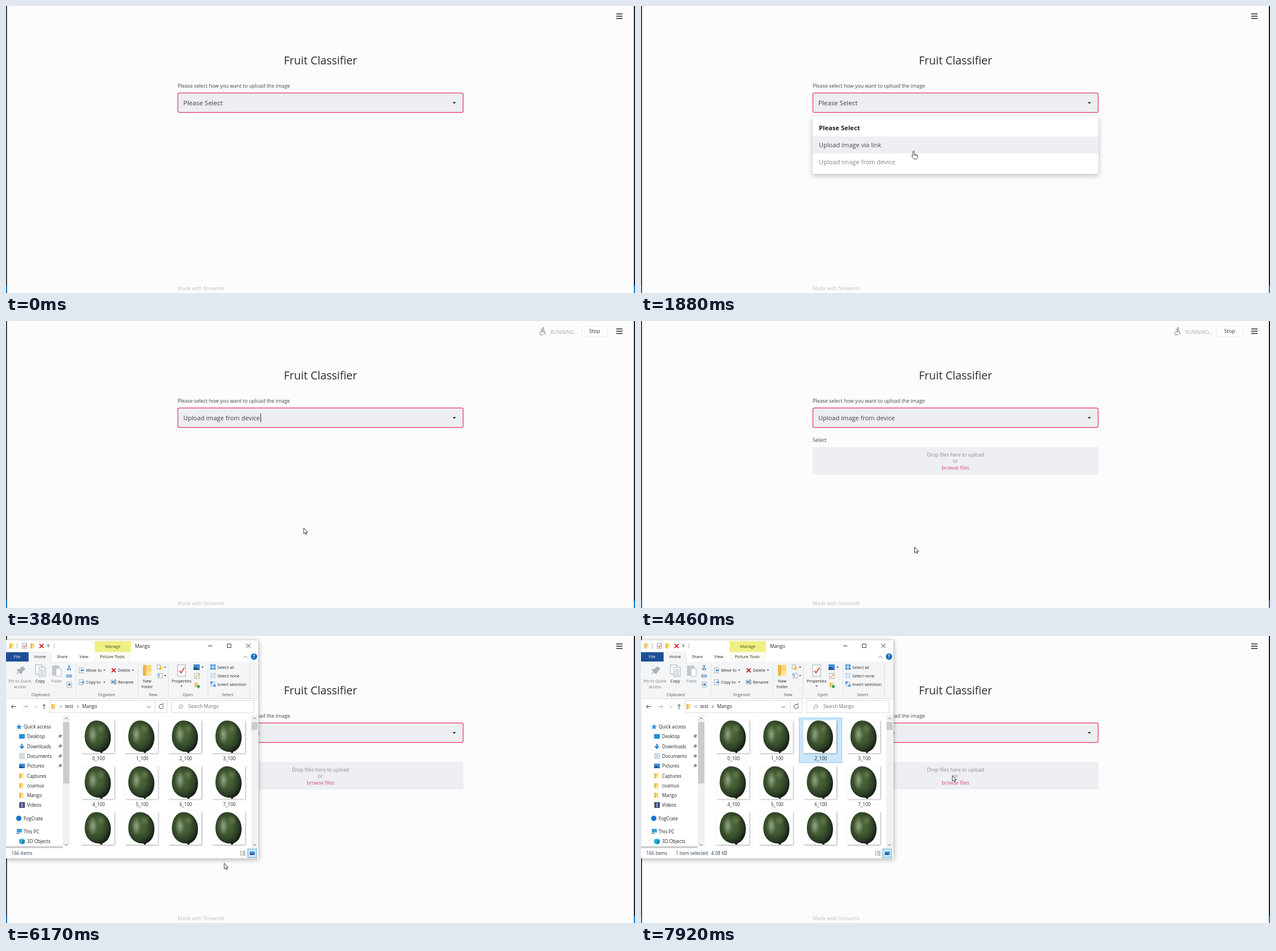
An HTML page that plays this animation: 1107x506 px, repeating every 8 s.

```html
<!DOCTYPE html>
<html lang="en">
<head>
<meta charset="utf-8">
<title>Fruit Classifier</title>
<style>
html, body { margin: 0; width: 100%; height: 100%; overflow: hidden; background: #fcfcfc; }
svg { display: block; width: 1107px; height: 506px; }
text { font-family: "Open Sans", "Noto Sans", sans-serif; white-space: pre; }
.mid { text-anchor: middle; }
</style>
</head>
<body>
<svg id="stage" viewBox="0 0 1107 506"></svg>
<script>
const LOOP = 8000;

// Markup helpers
const text = (x, y, s, size, fill = '#222', attr = '') =>
  `<text x="${x}" y="${y}" font-size="${size}" fill="${fill}" ${attr}>${s}</text>`;
const mid = (x, y, s, size, fill, attr = '') => text(x, y, s, size, fill, 'class="mid" ' + attr);
const rect = (x, y, w, h, fill, attr = '') =>
  `<rect x="${x}" y="${y}" width="${w}" height="${h}" fill="${fill}" ${attr}/>`;
const line = (d, stroke = '#555', width = 1, fill = 'none') =>
  `<path d="${d}" stroke="${stroke}" stroke-width="${width}" fill="${fill}"/>`;
const shape = (d, fill) => `<path d="${d}" fill="${fill}"/>`;
const circle = (x, y, r, fill) => `<circle cx="${x}" cy="${y}" r="${r}" fill="${fill}"/>`;
const oval = (x, y, rx, ry, fill) => `<ellipse cx="${x}" cy="${y}" rx="${rx}" ry="${ry}" fill="${fill}"/>`;
const group = (id, ...parts) => `<g id="${id}">${parts.join('')}</g>`;

// Small icons
const caretDown = (x, y, r = 2, fill = '#333') => shape(`M${x - r} ${y - r / 2}h${2 * r}l${-r} ${r}z`, fill);
const cross = (x, y, r, stroke, w) => line(`M${x - r} ${y - r}l${2 * r} ${2 * r}m0 ${-2 * r}l${-2 * r} ${2 * r}`, stroke, w);
const folder = (x, y, w = 7, h = 9) =>
  rect(x, y, w, h, '#f9d978') + rect(x, y, w * .4, h, '#e9b84a') + rect(x + w * .4, y + h * .6, w * .6, h * .4, '#fbe6a2');
const sheet = (x, y, w, h, stroke = '#8a939c') =>
  rect(x, y, w, h, '#fff', `stroke="${stroke}" stroke-width=".8"`);
const lines = (x, y, w, n, step, stroke) =>
  Array.from({ length: n }, (_, i) => line(`M${x} ${y + i * step}h${w}`, stroke, .7)).join('');
const picture = (x, y, w, h) =>
  rect(x, y, w, h, '#3f8fd8') + shape(`M${x} ${y + h}v${-h * .35}l${w * .35} ${-h * .25}l${w * .65} ${h * .6}z`, '#27548c');
const pin = (x, y) => line(`M${x - 3} ${y + 3}l2.5-2.5`, '#888', .8) +
  shape(`M${x - 2} ${y - 1}l4 4 1-2 2-2-3-3-2 2z`, '#8a8f94');

function webPage() {
  return [
    rect(0, 0, 1107, 506, '#fcfcfc'),
    rect(0, 0, 1.7, 506, '#262626'), rect(1105, 0, 2, 506, '#1c1c1c'),
    rect(0, 493, 1.7, 13, '#0b78c8'), rect(1105, 493, 2, 13, '#0b78c8'),
    line('M1074 14h11m-11 4h11m-11 4h11', '#262730', 1.6),
    mid(553.5, 103, 'Fruit Classifier', 19.5, '#2a2b33'),
    text(302, 144, 'Please select how you want to upload the image', 8.85, '#42434c'),
    rect(302.5, 153.4, 502, 34.2, '#eceef1', 'id="box" rx="2.5" stroke="#e8356a" stroke-width="1.25"'),
    caretDown(789, 171, 3.1, '#22232b'),
    text(312, 175, 'Please Select', 11.5, '#3f4048', 'id="valueBefore"'),
    text(312, 175, 'Upload image from device', 11.05, '#3f4048', 'id="valueAfter"'),
    rect(383, 163, 1, 15.5, '#222', 'id="caret"'),
    text(302, 501, 'Made with <tspan id="brand">Streamlit</tspan>', 8.85, '#bfc0c7'),
    group('uploader',
      text(302, 213, 'Select', 9, '#42434c'),
      rect(302, 222, 503, 48.5, '#edeff2', 'rx="1.5"'),
      mid(553.5, 238.8, 'Drop files here to upload', 8.7, '#8a8c95'),
      mid(553.5, 250.2, 'or', 8.7, '#8a8c95'),
      mid(553.5, 261.7, 'browse files', 8.78, '#dd4a72')),
    group('running',
      circle(945.5, 12.5, 1.6, '#999'),
      line('M945 14.5l-2 4.5h4.5l2 4.5M941 14.5l3.5.5 3 2', '#999', 1.6),
      line('M941.5 18.5a3.2 3.2 0 1 0 4 4.2', '#999', 1.2),
      text(958, 22.6, 'RUNNING...', 9, '#aaabb3'),
      rect(1013.5, 8.5, 45, 19.5, '#fdfdfd', 'rx="3" stroke="#ececf0"'),
      mid(1036, 21.3, 'Stop', 9.2, '#35363f')),
    group('menu',
      rect(302, 195, 503, 101, '#fff', 'rx="2.5" filter="url(#menuShadow)"'),
      rect(302, 260, 503, 30, '#eeeff2', 'id="hover"'),
      text(313, 219, 'Please Select', 11.2, '#1d1e25', 'font-weight="700"'),
      text(313, 249, 'Upload image via link', 11.05, '#85868e', 'id="optionLink"'),
      text(313, 279, 'Upload image from device', 11.05, '#4a4b53', 'id="optionDevice"'))
  ].join('');
}

function ribbon() {
  const small = 7.2;
  const label = (x, s) => mid(x, 106, s, small, '#555');
  return [
    rect(0, 45, 444, 65, '#f3f5f7'), line('M0 110.5h444', '#dadbdc'),
    ...[123, 232, 285, 355, 428].map(x => line(`M${x}.5 49v58`, '#dfe1e3')),
    line('M19 67l6-6', '#a5adb5', 1.5), shape('M18 59l9 9 2-5 5-5-5-5-5 5z', '#a9b1b9'),
    mid(24.5, 82, 'Pin to Quick', small, '#777'), mid(24.5, 92, 'access', small, '#777'),
    sheet(52, 51, 11, 16), sheet(58, 55, 11, 16), lines(60, 59, 7, 5, 2.4, '#6a9bd0'),
    mid(60, 82, 'Copy', small),
    rect(81, 52, 13, 18, '#c3c8ce'), sheet(88, 57, 9, 14, '#aab'), mid(89, 82, 'Paste', small, '#888'),
    line('M109 51l4 7m0-7l-4 7', '#2e75b6', 1), circle(109, 59, 1.4, '#2e75b6'), circle(113, 59, 1.4, '#2e75b6'),
    rect(106, 68, 10, 5, '#7aa7d4'), lines(107, 70.5, 8, 1, 1, '#fff'),
    sheet(107.5, 81, 7.5, 9), rect(109.5, 83.5, 4, 4, '#4a8ac4'), label(61, 'Clipboard'),
    sheet(129, 56, 7, 9), line('M138 60.5h-6m2-2l-2 2 2 2', '#2878c8', 1.1),
    text(141, 63, 'Move to', small), caretDown(173, 60.5),
    sheet(129, 77, 7, 9), line('M131 81.5h6m-2-2l2 2-2 2', '#2878c8', 1.1),
    text(141, 84, 'Copy to', small), caretDown(173, 81.5),
    cross(189.5, 60.5, 3.5, '#d4202c', 1.8), text(197, 63, 'Delete', small), caretDown(223.5, 60.5),
    sheet(185, 78, 9, 6), rect(186, 79.5, 5, 3, '#3d8ad0'), line('M192 76v10', '#555', .8),
    text(197, 84, 'Rename', small), label(177, 'Organize'),
    folder(241, 51, 15, 19), mid(248.5, 82, 'New', small), mid(248.5, 92, 'folder', small),
    sheet(266, 51, 6, 7), folder(270, 54, 6, 6), caretDown(280, 55),
    sheet(268, 66, 7, 8), line('M266 68h4v4', '#2878c8', .9), caretDown(280, 70), label(259, 'New'),
    sheet(302, 51, 14, 20), line('M305 61l3 4 6-9', '#dd4a35', 2), mid(309, 82, 'Properties', small), caretDown(309, 88.5),
    picture(330, 50, 11, 10), caretDown(346, 55),
    sheet(332, 66, 8, 9), line('M334 73l6-6', '#e8a33a', 1.6),
    folder(332, 82, 6, 8), circle(338.5, 89, 2.8, '#46a35a'), label(320, 'Open'),
    ...['Select all', 'Select none', 'Invert selection'].map((s, i) => {
      const y = 50 + i * 15, on = '#4f9be0', off = '#c9dcef';
      const tile = (dx, dy, c) => rect(359.5 + dx, y + dy, 4.2, 4.2, c);
      const a = i == 1 ? off : on, b = i == 0 ? on : off;
      return tile(0, 0, a) + tile(5.3, 0, b) + tile(0, 5.3, b) + tile(5.3, 5.3, a) + text(372, y + 8, s, small);
    }),
    label(390, 'Select')
  ].join('');
}

function sidebar() {
  const rows = [['Quick access', 160], ['Desktop', 177], ['Downloads', 194.5], ['Documents', 212], ['Pictures', 229],
    ['Captures', 246.5], ['coamux', 264], ['Mango', 281], ['Videos', 298], ['FogCrate', 321.5], ['This PC', 344.5], ['3D Objects', 362]];
  const icons = {
    'Quick access': shape('M23 155l1.5 3.4 3.5.3-2.7 2.4.9 3.6-3.2-1.9-3.2 1.9.9-3.6-2.7-2.4 3.5-.3z', '#2f8fe0'),
    Desktop: rect(23, 173, 10, 8, '#1e8fe0'), Downloads: line('M28 190v7m-3.5-3l3.5 4 3.5-4', '#2580d0', 2),
    Documents: sheet(24.5, 207, 7.5, 9) + lines(26, 209.5, 4.5, 3, 2, '#4a90d0'), Pictures: picture(23, 225, 10.5, 8),
    Videos: rect(23.5, 293, 9.5, 10, '#3b3b4c') + rect(26, 294, 4.5, 8, '#6f86c8'),
    FogCrate: circle(22.5, 321.5, 4.7, '#1478d0'),
    'This PC': rect(19, 340, 9, 6.5, '#3aa0e0') + rect(18, 347.5, 6, 1.5, '#777'),
    '3D Objects': shape('M28 357l5 2v6l-5 2.5-5-2.5v-6z', '#2ab5d8') + shape('M28 361l5-2v6l-5 2.5z', '#1689b0')
  };
  const outer = ['Quick access', 'FogCrate', 'This PC'];
  return rows.map(([s, y], i) =>
    (icons[s] || folder(23.5, y - 4.5)) + text(outer.includes(s) ? 31 : 37, y + 3, s, 8.15) +
    (i > 0 && i < 5 ? pin(94, y) : '')).join('') +
    rect(100, 140, 12, 230, '#f1f1f1') + rect(100.5, 152, 11, 108, '#cbcbcb') +
    line('M103.5 146.5l2.5-2.5 2.5 2.5M103.5 367l2.5 2.5 2.5-2.5', '#555') +
    rect(0, 370.5, 100, 3.5, '#cdcdcd');
}

function thumbnail(i) {
  const col = i % 4, row = i / 4 | 0, x = 161.5 + col * 76.7, y = 177.5 + row * 80.7;
  return rect(x - 29, y - 29, 58, 58, '#fff', 'filter="url(#thumbShadow)"') +
    `<g transform="translate(${x} ${y})">` +
    shape('M3 25l6-1-1 4.500-3 .5z', '#2a2118') +
    shape('M-3-28.500C12-28.500 23-15 23 1C23 16 15 27 4 27C-12 27-23 16-23 0C-23-17-14-28.500-3-28.500Z', 'url(#skin)') +
    oval(-9, -4, 8, 17, 'url(#shine)') + oval(6, -14, 9, 10, 'url(#blush)') + '</g>' +
    (row < 2 ? mid(x + 1.5, y + 41.8, i + '_100', 8.05) : '');
}

function explorer() {
  return group('explorer',
    rect(0, 7, 444.5, 385, '#fff', 'filter="url(#winShadow)" stroke="#b5b5b5" stroke-width=".6"'),
    rect(156, 9, 64, 19.5, '#eef082'), rect(156, 28.5, 64, 16.5, '#fafbf2'),
    folder(6, 13), line('M19.5 13v9', '#999', .8), sheet(28.5, 13, 8, 9), line('M30 17l2 3 4-5', '#dd4a35', 1.2),
    folder(43, 13), cross(62.5, 17.5, 3.7, '#d4202c', 1.8), line('M72.5 15.5h4', '#333', .8), caretDown(74.5, 18.5),
    line('M84.5 13v9', '#999', .8),
    mid(188, 20.8, 'Manage', 7.2, '#4a4a20'), text(227, 20.7, 'Mango', 8.3),
    line('M356 17.5h7M389.5 14h6.5v6.5h-6.5z', '#222', .9), cross(426.5, 17.3, 3.5, '#222', .9),
    rect(0, 28.5, 40, 16.5, '#1c4f97'), rect(40, 28.5, 39.5, 17, '#f3f5f7', 'stroke="#dfe1e3" stroke-width=".6"'),
    mid(19.5, 39.3, 'File', 7.2, '#fff'), mid(60, 39.3, 'Home', 7.2), mid(99, 39.3, 'Share', 7.2),
    mid(137, 39.3, 'View', 7.2), mid(187, 39.3, 'Picture Tools', 7.3),
    line('M418 38.5l3.5-3 3.5 3', '#888'), circle(436.5, 36.3, 5.6, '#0f6cc0'),
    mid(436.5, 39.2, '?', 8, '#fff', 'font-weight="700"'),
    ribbon(),
    line('M17.5 124.5h-8m3-3l-3 3 3 3', '#333'), line('M30 124.5h8m-3-3l3 3-3 3', '#aaa'),
    line('M50 123.5l2.5 2.5 2.5-2.5', '#999'), line('M67 129v-8.5m-3 3l3-3 3 3', '#444'),
    rect(77.5, 113.5, 206, 21.5, '#fff', 'stroke="#d9d9d9"'), folder(80, 120),
    line('M96 122.5l-2 2 2 2m3-4l-2 2 2 2', '#666', .8), text(104, 127.3, 'test', 8.15),
    line('M125 122l2.5 2.5-2.5 2.5', '#555'), text(134, 127.3, 'Mango', 8.2),
    line('M248 123.5l3 3 3-3', '#555'), line('M262.5 114v21', '#d9d9d9'),
    line('M276.5 122.5a3.8 3.8 0 1 1-3.5-2h3.5v-2', '#444'),
    rect(291.5, 113.5, 145, 21.5, '#fff', 'stroke="#d9d9d9"'),
    line('M303 128.5l2.5-2.5a3 3 0 1 1 1 1', '#777', .9), text(321, 127.3, 'Search Mango', 8.1, '#707070'),
    sidebar(),
    rect(278.5, 144.5, 75, 79, '#cbe6fb', 'id="selection" stroke="#98cdf3"'),
    rect(355, 306, 76, 68, '#e3f1fc', 'id="tileHover"'),
    ...Array.from({ length: 12 }, (_, i) => thumbnail(i)),
    rect(431.5, 140, 12, 234, '#f1f1f1'), rect(432, 152, 11, 13.5, '#cbcbcb'),
    line('M435 146.5l2.5-2.5 2.5 2.5M435 367l2.5 2.5 2.5-2.5', '#555'),
    rect(0.3, 374, 443.9, 17.7, '#fff'),
    text(9.5, 386, '166 items', 8.1, '#2c3c54'),
    group('status', text(61, 386, '1 item selected', 8.1, '#2c3c54'), text(123.5, 386, '4.08 KB', 8.1, '#2c3c54')),
    lines(412, 379.5, 2.5, 4, 2.3, '#555'), lines(416, 379.5, 5.5, 4, 2.3, '#555'),
    rect(425.5, 375.5, 15.5, 15, '#cbe6fb', 'stroke="#5ba9dc"'), picture(429, 380, 9, 6));
}

const shadow = (id, dx, dy, blur, alpha) =>
  `<filter id="${id}" x="-20%" y="-20%" width="140%" height="150%"><feDropShadow dx="${dx}" dy="${dy}" stdDeviation="${blur}" flood-opacity="${alpha}"/></filter>`;
const glow = (id, color, alpha) =>
  `<radialGradient id="${id}"><stop stop-color="${color}" stop-opacity="${alpha}"/><stop offset="1" stop-color="${color}" stop-opacity="0"/></radialGradient>`;
const $ = id => document.getElementById(id);

$('stage').innerHTML = '<defs>' +
  shadow('menuShadow', 0, 3, 5, .25) + shadow('winShadow', 0, 2, 4.5, .3) + shadow('thumbShadow', 1, 1, 1, .4) +
  glow('shine', '#c3d0bf', .6) + glow('blush', '#7d9460', .55) +
  `<radialGradient id="skin" cx=".42" cy=".44" r=".6"><stop offset="0" stop-color="#4f6b40"/>
   <stop offset=".45" stop-color="#41592f"/><stop offset=".78" stop-color="#2b3d26"/><stop offset="1" stop-color="#151d15"/></radialGradient></defs>` +
  webPage() + explorer() + group('cursor',
    group('hand', line('M-1.5 8V.8C-1.5-.8 1-.8 1 .8V5.5L5.5 6.5Q7 7 6.7 8.5L6 12.5L5 14H.5L-3.5 9Q-3.5 7-1.5 8ZM1 5.5v2M3 6v2M5 6.5v2', '#333', .9, '#fff')),
    group('arrow', line('M0 0V10L2.3 8L4 11.5L5.5 10.8L4 7.5H7Z', '#222', .9, '#fff')));

// Pointer stops: time, x, y
const pointer = [[790, 548, 172], [1170, 487.5, 251], [1500, 480, 256], [1880, 480, 256], [2420, 475, 285],
  [2670, 475, 285], [2750, 474, 286], [3300, 474, 286], [3840, 524, 365], [4540, 480, 400], [5000, 480, 400],
  [5400, 365, 520], [5850, 365, 520], [6380, 394, 338], [6590, 303, 170], [6700, 303, 170],
  [7130, 420, 206], [7340, 420, 206], [7900, 548, 246]];

const clamp = v => Math.max(0, Math.min(1, v));
const ramp = (t, from, to) => clamp((t - from) / (to - from));
const ease = k => k * k * (3 - 2 * k);
const show = (id, on) => $(id).style.display = on ? '' : 'none';

function pointerAt(t) {
  const i = pointer.findIndex(p => p[0] > t);
  if (i < 0) return pointer[pointer.length - 1].slice(1);
  if (i == 0) return pointer[0].slice(1);
  const [t0, x0, y0] = pointer[i - 1], [t1, x1, y1] = pointer[i];
  const k = ease(ramp(t, t0, t1));
  return [x0 + (x1 - x0) * k, y0 + (y1 - y0) * k];
}

function draw(t) {
  const [x, y] = pointerAt(t), picked = t >= 3340;

  show('cursor', t >= 790);
  $('cursor').setAttribute('transform', `translate(${x} ${y})`);
  show('hand', !picked);
  show('arrow', picked);

  const focus = 1 - .45 * ramp(t, 1080, 1160) + .45 * ramp(t, 1210, 1330);
  $('box').setAttribute('stroke-opacity', focus);
  show('valueBefore', !picked);
  show('valueAfter', picked);
  show('caret', t >= 1160 && t < 1670 || t >= 2170 && t < 2670 || picked && t < 3890);
  $('caret').setAttribute('x', picked ? 447.8 : 383);

  const onDevice = y >= 260;
  show('menu', t >= 1210 && !picked);
  $('hover').setAttribute('y', onDevice ? 260 : 230);
  $('optionLink').setAttribute('fill', onDevice ? '#85868e' : '#4a4b53');
  $('optionDevice').setAttribute('fill', onDevice ? '#4a4b53' : '#85868e');

  show('running', t >= 3500 && t < 4520);
  show('uploader', t >= 4300);
  $('brand').setAttribute('fill', t >= 5330 && t < 5590 ? '#9b9ca4' : '#bfc0c7');

  const open = ease(ramp(t, 5750, 5950)), scale = .9 + .1 * open;
  show('explorer', open > 0);
  $('explorer').setAttribute('opacity', open);
  $('explorer').setAttribute('transform', `translate(222 200) scale(${scale}) translate(-222 -200)`);
  show('selection', t >= 6580);
  show('status', t >= 6580);
  show('tileHover', t >= 6330 && t < 6700);
}

function tick() {
  draw(performance.now() % LOOP);
  requestAnimationFrame(tick);
}
tick();
</script>
</body>
</html>
```
